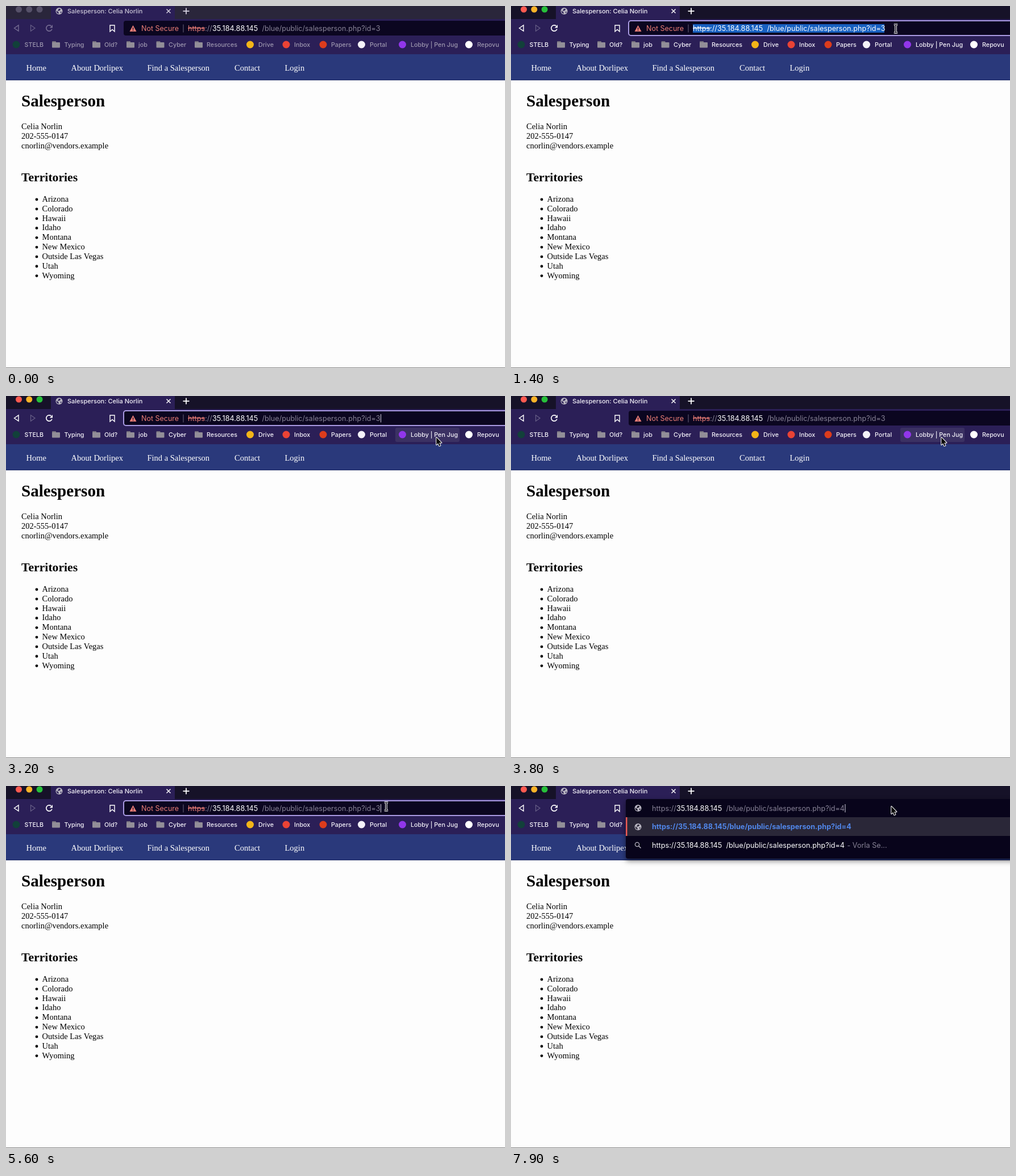
Write an HTML page with a canvas that moves like this. It is 878x638 px and loops after 8 s.

```html
<!DOCTYPE html>
<html lang="en">
<head>
<meta charset="utf-8">
<title>Salesperson</title>
<style>
html, body { margin: 0; width: 100%; height: 100%; overflow: hidden; background: #fdfdfd; }
canvas { display: block; width: 878px; height: 638px; }
</style>
</head>
<body>
<canvas id="stage"></canvas>
<script>
const W = 878, H = 638, LOOP = 8000, STEP = 100;
const canvas = document.getElementById('stage');
const ctx = canvas.getContext('2d');
const dpr = window.devicePixelRatio || 1;
canvas.width = W * dpr;
canvas.height = H * dpr;

const UI = 'Inter, "Open Sans", sans-serif';
const SERIF = '"Liberation Serif", "Times New Roman", serif';
const URL_FONT = `12.65px ${UI}`;
const PURPLE = '#2b1f57', FIELD = '#0b0620', SALMON = '#ea7d76', GREY = '#878296', WHITE = '#fff';
const PERSON = 'Celia Norlin';
const HOST = '35.184.88.145';
const PATH = '/blue/public/salesperson.php?id=';

// Moments of the recorded session, in ms
const T = {
  enter: 500, activate: 1200, deselect: 1900, blur: 3500, refocus: 4900,
  deselect2: 5300, arrow: 6600, erase: 7300, type: 7600
};
// Pointer stops: time, x, y
const STOPS = [[500, 856, 572], [1100, 677, 40], [2200, 677, 40], [2900, 757, 73],
  [4100, 757, 73], [4700, 669, 36]];
// Bookmarks: label, label x, icon x, icon colour (none for a folder)
const BOOKMARKS = [
  ['STELB', 32.5, 18, '#12403a'], ['Typing', 102.5, 88], ['Old?', 173, 159], ['job', 233, 219],
  ['Cyber', 286, 271.5], ['Resources', 353, 339], ['Drive', 444, 429.5, '#f2b518'],
  ['Inbox', 507, 493, '#ea4335'], ['Papers', 572, 558, '#dc3c1c'], ['Portal', 640, 625.5, '#f4f2f8'],
  ['Lobby | Pen Jug', 712, 697.5, '#9136ea'], ['Repovu', 829, 814.5, '#fff']
];
const NAV = [['Home', 35.5], ['About Dorlipex', 114.5], ['Find a Salesperson', 248.5],
  ['Contact', 402], ['Login', 490.5]];
const PLACES = ['Arizona', 'Colorado', 'Hawaii', 'Idaho', 'Montana', 'New Mexico',
  'Outside Las Vegas', 'Utah', 'Wyoming'];

function rect(x, y, w, h, color) {
  ctx.fillStyle = color;
  ctx.fillRect(x, y, w, h);
}

function dot(x, y, r, color) {
  ctx.fillStyle = color;
  ctx.beginPath();
  ctx.arc(x, y, r, 0, Math.PI * 2);
  ctx.fill();
}

function text(str, x, y, font, color) {
  ctx.font = font;
  ctx.fillStyle = color;
  ctx.fillText(str, x, y);
  return x + ctx.measureText(str).width;
}

function trace(points, closed) {
  ctx.beginPath();
  points.forEach(([x, y], i) => i ? ctx.lineTo(x, y) : ctx.moveTo(x, y));
  if (closed) ctx.closePath();
}

function line(points, color, width, closed) {
  trace(points, closed);
  ctx.strokeStyle = color;
  ctx.lineWidth = width;
  ctx.stroke();
}

function shape(points, color) {
  trace(points, true);
  ctx.fillStyle = color;
  ctx.fill();
}

function roundBox(x, y, w, h, r) {
  ctx.beginPath();
  ctx.roundRect(x, y, w, h, r);
}

function globe(x, y, back) {
  dot(x, y, 6, '#b9b6c2');
  shape([[x - 5, y - 1], [x - 1, y + 2], [x - 1, y + 5], [x - 4, y + 3]], back);
  shape([[x, y - 4.5], [x + 3, y - 3], [x + 1, y - 1], [x - 2, y], [x - 2, y - 2]], back);
  shape([[x + 2, y + 1], [x + 4.5, y + 1], [x + 3, y + 4]], back);
}

function folder(x, y) {
  ctx.fillStyle = '#77727f';
  roundBox(x - 7, y - 6, 7, 4, 1);
  ctx.fill();
  ctx.fillStyle = '#928e98';
  roundBox(x - 7, y - 4, 14, 9.5, 1);
  ctx.fill();
}

// Draws the address and returns its right edge
function address(x, y, id, scheme, host, rest) {
  if (scheme === SALMON) {
    const end = text('https', x, y, URL_FONT, SALMON);
    text('://', end, y, URL_FONT, rest);
    rect(x, y - 5, end - x, 1.2, SALMON);
  } else {
    text('https://', x, y, URL_FONT, scheme);
  }
  text(HOST, x + 43, y, URL_FONT, host);
  return text(PATH + id, x + 130.5, y, URL_FONT, rest);
}

function caret(x) {
  rect(x + 0.5, 32, 1, 14.5, '#d8d4e4');
}

function drawPage() {
  rect(0, 0, W, H, '#fdfdfd');
  rect(0, 85, W, 46, '#2a397b');
  rect(0, 130, W, 1, '#212d66');
  const body = `14.5px ${SERIF}`;
  NAV.forEach(([label, x]) => text(label, x, 114, body, WHITE));
  text('Salesperson', 27, 177, `bold 29.1px ${SERIF}`, '#000');
  [PERSON, '202-555-0147', 'cnorlin@vendors.example'].forEach((s, i) =>
    text(s, 27, 217 + i * 16.8, body, '#000'));
  text('Territories', 27, 308.5, `bold 21.7px ${SERIF}`, '#000');
  PLACES.forEach((name, i) => {
    const y = 345 + i * 16.82;
    dot(54, y - 4, 2.4, '#000');
    text(name, 63.5, y, body, '#000');
  });
  rect(0, 637, W, 1, '#858585');
}

function drawTabs(active) {
  rect(0, 0, W, 23, active ? '#161228' : '#2a263b');
  rect(79, 0, 218, 24, PURPLE);
  const lights = active ? ['#ff5a50', '#fcb428', '#27c03a'] : ['#57526a', '#57526a', '#57526a'];
  lights.forEach((c, i) => dot(22.5 + i * 18.3, 6, 5.5, c));
  globe(93.5, 9, PURPLE);
  text('Salesperson: ' + PERSON, 108, 13, `500 11px ${UI}`, active ? '#f3f1f8' : '#c9c5d6');
  const cross = active ? WHITE : '#d5d1df';
  line([[282.5, 5.5], [289.5, 12.5]], cross, 1.4);
  line([[289.5, 5.5], [282.5, 12.5]], cross, 1.4);
  line([[311.5, 9], [322.5, 9]], cross, 1.8);
  line([[317, 3.5], [317, 14.5]], cross, 1.8);
}

function drawButtons(active) {
  const on = active ? WHITE : '#756c92', off = '#655c85';
  line([[14.5, 39], [22, 33.8], [22, 44.2]], on, 1.4, true);
  line([[51, 39], [43.5, 33.8], [43.5, 44.2]], off, 1.3, true);
  ctx.beginPath();
  ctx.arc(76, 39, 5.2, 0.35, Math.PI * 1.72);
  ctx.strokeStyle = on;
  ctx.lineWidth = 1.7;
  ctx.stroke();
  shape([[82, 33], [82, 38.5], [76.8, 38.5]], on);
  line([[183, 34], [191, 34], [191, 45], [187, 41.5], [183, 45]], WHITE, 1.4, true);
}

function drawField(focused, selected, blink) {
  roundBox(207, 26, 700, 26, 4);
  ctx.fillStyle = FIELD;
  ctx.fill();
  if (focused) {
    ctx.strokeStyle = '#a99ae2';
    ctx.lineWidth = 2;
    ctx.stroke();
  }
  shape([[223.5, 34], [229.5, 45], [217.5, 45]], SALMON);
  rect(222.9, 38, 1.3, 3.5, FIELD);
  rect(222.9, 42.4, 1.3, 1.3, FIELD);
  text('Not Secure', 238, 43.5, `12.5px ${UI}`, SALMON);
  rect(311.5, 32.5, 1, 14, '#6b657c');
  if (selected) {
    rect(320, 32, 337, 15, '#1760c0');
    address(320, 43.5, '3', WHITE, WHITE, WHITE);
    rect(320, 38.5, 31, 1.2, WHITE);
  } else {
    const end = address(320, 43.5, '3', SALMON, WHITE, GREY);
    if (blink) caret(end);
  }
}

function drawBookmarks(active, hover) {
  if (hover) {
    roundBox(685, 56, 113, 25, 3);
    ctx.fillStyle = '#3b3163';
    ctx.fill();
  }
  const color = active ? '#f5f3fa' : '#9c96ae';
  BOOKMARKS.forEach(([label, x, icon, fill]) => {
    if (fill) dot(icon, 68, 6.5, fill);
    else folder(icon, 68);
    text(label, x, 72, `500 10.75px ${UI}`, color);
  });
}

function drawSuggestions(id, blink) {
  ctx.save();
  ctx.shadowColor = 'rgba(0,0,0,.5)';
  ctx.shadowBlur = 10 * dpr;
  ctx.shadowOffsetY = 4 * dpr;
  roundBox(202, 23, 720, 105, 4);
  ctx.fillStyle = '#08041b';
  ctx.fill();
  ctx.restore();
  rect(202, 55, W - 202, 33, '#2a2738');
  rect(202, 55, 2.5, 33, '#ee5b55');
  globe(223.5, 39, '#08041b');
  globe(223.5, 72, '#2a2738');
  ctx.beginPath();
  ctx.arc(222, 103, 3.6, 0, Math.PI * 2);
  ctx.strokeStyle = '#b9b6c2';
  ctx.lineWidth = 1.3;
  ctx.stroke();
  line([[224.7, 105.7], [228.5, 109.5]], '#b9b6c2', 1.5);

  const end = address(248, 43.5, id, GREY, WHITE, GREY);
  if (blink) caret(end);
  text('https://' + HOST + PATH + id, 248, 76.3, `700 12.65px ${UI}`, '#5187ea');
  const tail = address(248, 109, id, WHITE, WHITE, WHITE);
  text('- Vorla Se...', tail + 4.5, 109, URL_FONT, GREY);
}

function pointerAt(t) {
  let i = 0;
  while (i < STOPS.length - 1 && t >= STOPS[i + 1][0]) i++;
  const [t0, x0, y0] = STOPS[i];
  const [t1, x1, y1] = STOPS[i + 1] || [t0 + 1, x0, y0];
  const p = Math.min(1, (t - t0) / (t1 - t0));
  const e = p * p * (3 - 2 * p);
  return [x0 + (x1 - x0) * e, y0 + (y1 - y0) * e];
}

function drawPointer(t) {
  if (t < T.enter) return;
  const [x, y] = pointerAt(t);
  const beam = t < T.arrow && x > 207 && y > 25 && y < 53;
  ctx.save();
  ctx.translate(x, y);
  ctx.lineJoin = 'round';
  if (beam) {
    [['#fff', 3.2], ['#15121f', 1.2]].forEach(([color, width]) => {
      line([[-3.2, -7.2], [-1, -7.2], [0, -6], [0, 6], [-1, 7.2], [-3.2, 7.2]], color, width);
      line([[3.2, -7.2], [1, -7.2], [0, -6], [0, 6], [1, 7.2], [3.2, 7.2]], color, width);
    });
  } else {
    const arrow = [[0.3, 0], [0.3, 13], [3.2, 10.3], [5.3, 15.2], [7.4, 14.3], [5.4, 9.5], [9.4, 9.5]];
    line(arrow, WHITE, 2, true);
    shape(arrow, '#0a0a0a');
  }
  ctx.restore();
}

function blinkAt(t) {
  const since = [T.type, T.erase, T.deselect2, T.deselect].find(s => t >= s);
  return since !== undefined && (t - since) % 1000 < 500;
}

function draw(t) {
  ctx.setTransform(dpr, 0, 0, dpr, 0, 0);
  const active = t >= T.activate;
  const focused = active && (t < T.blur || t >= T.refocus);
  const selected = focused && (t < T.deselect || (t >= T.refocus && t < T.deselect2));
  const blink = focused && !selected && blinkAt(t);
  const [px, py] = pointerAt(t);
  const hover = active && px > 685 && px < 798 && py > 56 && py < 81;

  drawPage();
  drawTabs(active);
  rect(0, 23, W, 62, PURPLE);
  drawButtons(active);
  drawField(focused, selected, blink);
  drawBookmarks(active, hover);
  if (t >= T.erase) drawSuggestions(t >= T.type ? '4' : '', blink);
  drawPointer(t);
}

const start = performance.now();
function tick() {
  const t = (performance.now() - start) % LOOP;
  draw(Math.floor(t / STEP) * STEP);
  requestAnimationFrame(tick);
}
tick();
</script>
</body>
</html>
```
